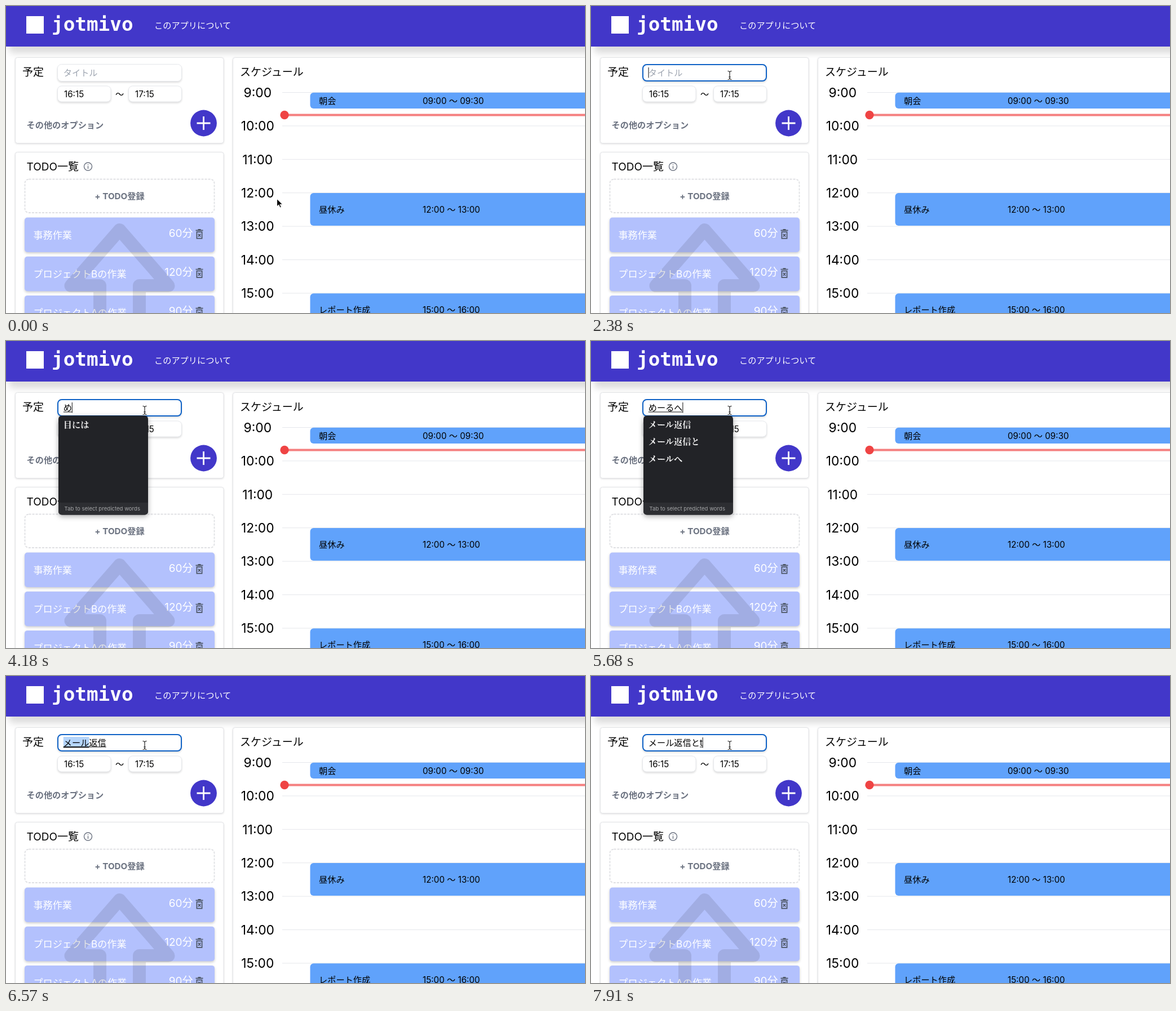
These frames come from a looping animation (1027 by 545 pixels, 8 s). An HTML page:

```html
<!DOCTYPE html>
<html lang="ja">
<head>
<meta charset="utf-8">
<title>スケジュール</title>
<style>
html, body { margin: 0; width: 100%; height: 100%; overflow: hidden; background: #fff; }
svg { display: block; width: 1027px; height: 545px; }
text { font: 15.2px Inter, "Noto Sans CJK JP", "Noto Sans CJK", sans-serif; white-space: pre; }
.t17 { font-size: 17.1px; }
.t19 { font-size: 19px; }
.hour { font-size: 22.8px; text-anchor: middle; }
.mid { text-anchor: middle; }
.end { text-anchor: end; }
.bold { font-weight: 700; fill: #6b7280; }
.white { fill: #fff; }
.logo { font: 700 34.3px "DejaVu Sans Mono", monospace; }
.card { fill: #fff; stroke: #e2e3e6; filter: drop-shadow(0 1.5px 1.5px #0002); }
.box { fill: #fff; stroke: #e5e7eb; filter: drop-shadow(0 2px 1.5px #0002); }
.todo { fill: #b3c1fd; filter: drop-shadow(0 2px 2px #0003); }
.event { fill: #60a2fb; }
.row { font: 600 15.2px "Noto Serif CJK JP", "Noto Sans CJK JP", "Noto Sans CJK", serif; fill: #f4f4f4; }
.hint { font-size: 9.6px; fill: #a6a7a9; }
#panel { filter: drop-shadow(0 3px 5px #0005); }
</style>
</head>
<body>
<svg viewBox="0 0 1027 545">
  <rect x="5" y="20" width="1100" height="64" rx="8" fill="#0002" style="filter:blur(6px)"/>
  <rect width="1027" height="72" fill="#4237c9"/>
  <rect x="36" y="18" width="31" height="31" fill="#fff"/>
  <text class="logo white" x="81" y="44">jotmivo</text>
  <text class="white" x="263" y="39.5">このアプリについて</text>

  <rect class="card" x="16.5" y="91.5" width="369.5" height="152" rx="4"/>
  <rect class="card" x="16.5" y="259.5" width="369.5" height="320" rx="4"/>
  <rect class="card" x="402.5" y="91.5" width="700" height="500" rx="4"/>

  <text class="t19" x="29" y="123.5">予定</text>
  <rect class="box" x="91.5" y="103.5" width="220" height="30" rx="7"/>
  <rect class="box" x="91.5" y="142" width="94.5" height="28" rx="7"/>
  <rect class="box" x="217.5" y="142" width="94" height="28" rx="7"/>
  <text x="103" y="161.5">16:15</text>
  <text class="mid" x="201.5" y="161.5">〜</text>
  <text x="229" y="161.5">17:15</text>
  <text class="bold" x="36.5" y="217">その他のオプション</text>
  <circle cx="350.5" cy="208" r="23.4" fill="#4237c9"/>
  <path d="M338.5 208h24M350.5 196v24" stroke="#fff" stroke-width="2.8"/>

  <text class="t19" x="36.5" y="292">TODO一覧</text>
  <g fill="none" stroke="#6b7280" stroke-width="1.4">
    <circle cx="145.5" cy="285" r="7"/>
    <path d="M145.5 284v5M145.5 281v1.6"/>
  </g>
  <rect x="33.5" y="307.5" width="336" height="59.5" rx="7" fill="none" stroke="#dfe0e3" stroke-width="1.8" stroke-dasharray="4 2"/>
  <text class="bold mid" x="201.5" y="343">+ TODO登録</text>
  <g id="todos"></g>
  <path d="M166.5 570V496.5H115L201.5 397.5L288 496.5H236.5V570" fill="none" stroke="#0000001a" stroke-width="23" stroke-linejoin="round"/>

  <text class="t19" x="415" y="123.5">スケジュール</text>
  <g id="hours"></g>
  <g id="events"></g>
  <path d="M494 193.5H1027" stroke="#f57f7f" stroke-width="3.8"/>
  <circle cx="494" cy="193.5" r="7.7" fill="#ef4444"/>

  <rect id="focus" x="92" y="104" width="219" height="29" rx="7" fill="none" stroke="#0f62c6" stroke-width="2"/>
  <rect id="mark" x="101.8" y="108" width="45.6" height="19" fill="#b5d5fb"/>
  <text id="field" x="101.8" y="123.8"></text>
  <path id="under" stroke="#111"/>
  <path id="thick" d="M101.8 126.2h45.4" stroke="#111" stroke-width="2"/>
  <path id="caret" stroke="#222" stroke-width="1.1"/>

  <g id="popup">
    <rect id="panel" x="93" y="132.5" width="159" height="176" rx="6" fill="#222327"/>
    <path d="M93 287h159v15.5a6 6 0 0 1-6 6H99a6 6 0 0 1-6-6z" fill="#2d2e32"/>
    <g id="rows"></g>
    <text class="hint" x="103.5" y="301">Tab to select predicted words</text>
  </g>

  <path id="arrow" d="M0 0V14.2L3.3 11.2L5.6 16.2L8 15.2L5.8 10.2H10.2Z" fill="#000" stroke="#fff" stroke-width="1.1"/>
  <g id="beam" fill="none">
    <path d="M-3.5 -7.5Q0 -7.5 0 -5Q0 -7.5 3.5 -7.5M0 -6V6M-3.5 7.5Q0 7.5 0 5Q0 7.5 3.5 7.5M-1.8 3H1.8" stroke="#fff" stroke-width="2.6"/>
    <path d="M-3.5 -7.5Q0 -7.5 0 -5Q0 -7.5 3.5 -7.5M0 -6V6M-3.5 7.5Q0 7.5 0 5Q0 7.5 3.5 7.5M-1.8 3H1.8" stroke="#111" stroke-width="1.1"/>
  </g>
</svg>
<script>
const LOOP = 8000, LEFT = 101.8, EM = 15.2;
const $ = id => document.getElementById(id);
const show = (id, on) => $(id).style.display = on ? '' : 'none';
const label = (cls, x, y, s) => `<text class="${cls}" x="${x}" y="${y}">${s}</text>`;

$('todos').innerHTML = [['事務作業', 60], ['プロジェクトBの作業', 120], ['プロジェクトAの作業', 90]]
  .map(([name, min], i) => `<g transform="translate(0 ${i * 69.2})">
    <rect class="todo" x="33" y="375.5" width="337" height="61.5" rx="5"/>
    ${label('t17 white', 48.5, 412.5, name)}${label('t19 white end', 331.5, 410, min + '分')}
    <path d="M336.5 398.3h13M340.5 396.8h5M338.4 401.2h9.2v11.4h-9.2zM340.7 404.5l4.6 5M345.3 404.5l-4.6 5"
      fill="none" stroke="#4b5563" stroke-width="1.7"/></g>`).join('');

const hourY = h => 153.5 + (h - 9) * 59.4;
for (let h = 9; h < 16; h++) {
  $('hours').innerHTML += `<path d="M490 ${hourY(h)}H1027" stroke="#e5e7eb"/>` +
    label('hour', 446.3, hourY(h) + 8.2, h + ':00');
}

$('events').innerHTML = [
  ['朝会', 9, .5, '09:00 〜 09:30'],
  ['昼休み', 12, 1, '12:00 〜 13:00'],
  ['レポート作成', 15, 1, '15:00 〜 16:00']
].map(([name, start, len, time]) => {
  const y = hourY(start) + .3, h = len * 59.4 - 1.4, base = y + h / 2 + 5.6;
  return `<rect class="event" x="539.5" y="${y}" width="520" height="${h}" rx="6"/>` +
    label('', 555, base, name) + label('', 739, base, time);
}).join('');

// time, committed text, text being composed, caret, suggestions
const steps = [
  [0, '', '', 0],
  [2380, '', '', 1],
  [2830, '', '', 0],
  [3430, '', 'm', 1],
  [3880, '', 'm', 0],
  [4180, '', 'め', 1, ['目には']],
  [4330, '', 'めー', 1, ['メール', 'メール返信', 'メートル', 'メーカー', 'メールアドレスを…']],
  [4930, '', 'めーる', 1, ['メール', 'メール返信', 'メール返信と']],
  [5380, '', 'めーる', 0, ['メール', 'メール返信', 'メール返信と']],
  [5680, '', 'めーるへ', 1, ['メール返信', 'メール返信と', 'メールへ']],
  [5830, '', 'めーるへn', 1],
  [5980, '', 'めーるへんs', 1],
  [6130, '', 'めーるへんし', 1, ['メール返信', 'メール返信と']],
  [6280, '', 'めーるへんしn', 1],
  [6420, '', 'めーるへんしん', 1, ['メール返信', 'メール返信と']],
  [6570, '', 'メール返信', 0],
  [6720, 'メール返信', '', 1],
  [7320, 'メール返信', 't', 1],
  [7470, 'メール返信', 'と', 1, ['と', '戸']],
  [7610, 'メール返信と', '', 1],
  [7910, 'メール返信と', 't', 1]
];

function drawField(t) {
  const [at, done, typing, caret, rows] = steps.findLast(s => s[0] <= t);
  const focused = t >= 2380, empty = !done && !typing, converted = at === 6570;
  const field = $('field');
  field.textContent = empty ? 'タイトル' : done + typing;
  field.setAttribute('fill', empty ? '#9ca3af' : '#000');
  const from = LEFT + done.length * EM;
  const to = empty ? LEFT : LEFT + field.getComputedTextLength();
  $('under').setAttribute('d', typing ? `M${from} 126H${to}` : '');
  $('caret').setAttribute('d', `M${to + .3} 109V127.5`);
  show('focus', focused);
  show('caret', caret);
  show('mark', converted);
  show('thick', converted);
  show('popup', rows);
  if (rows) {
    $('popup').setAttribute('transform', `translate(${from - LEFT} 0)`);
    $('rows').innerHTML = rows.map((s, i) => label('row', 101.8, 153.8 + i * 30.6, s)).join('');
  }
}

function drawPointer(t) {
  const moves = t < 1500 ? 0 : Math.min(6, 1 + Math.floor((t - 1500) / 148));
  const p = moves / 6, e = p * p * (3 - 2 * p);
  const x = 480.5 + (246 - 480.5) * e, y = 342 + (123 - 342) * e;
  const over = y < 134 && x < 312;
  show('arrow', !over);
  show('beam', over);
  $(over ? 'beam' : 'arrow').setAttribute('transform', `translate(${x} ${y})`);
}

const start = performance.now();
function frame() {
  const t = (performance.now() - start) % LOOP;
  drawField(t);
  drawPointer(t);
  requestAnimationFrame(frame);
}
frame();
</script>
</body>
</html>
```
